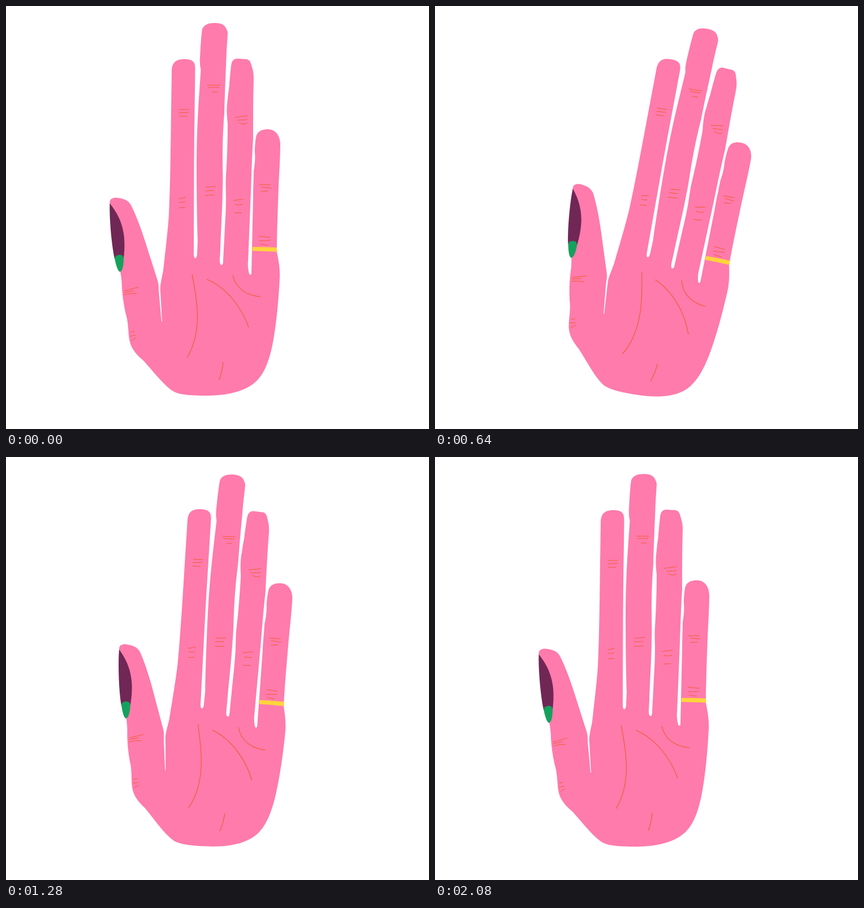
Write an HTML page that moves like this. It is 748 by 748 pixels and loops after 2720 ms.

```html
<!DOCTYPE html>
<html lang="en">
<head>
<meta charset="utf-8">
<title>Waving hand</title>
<style>
  html, body { margin: 0; width: 100%; height: 100%; overflow: hidden; background: #fff; }
  svg { display: block; width: 100%; height: 100%; }
</style>
</head>
<body>
<svg viewBox="0 0 748 748">
  <g id="hand">
    <!-- skin -->
    <path fill="#ff7bac" d="M183.500 349C182.500 341 189 339 195 339C207 340 216 343 221 352C230 370 239 394 246 416
      L267 482C270 490 270 496 270 503L275 558L276 558L273 505C272 494 275 484 278 468
      C281 440 286 400 288 370C290 330 291 270 292 185L293 117C293 101 299 94 316 94
      C330 94 334.500 99 334.500 110C334 160 333 220 332.500 280L332 438C332 443 333 446 335 446
      C337 445 338 442 338 437L339 415C338 390 337 330 337 280C337 240 339 190 342 150
      C343 135 344 122 344.500 112C342.500 105 342.500 96 343.500 82C344.500 65 345.500 50 347 41
      C350 33 358 30 369 30C380 30 386 33 389 39C391 43 392 45 392 49L390 80
      C389 110 387 150 386 190C384 215 383 240 383 265C383 290 384 310 383 325
      C383 350 380 400 379 430L378 449C378 455 379 458 381 458C383 458 384 456 384 450
      L387 392C388 375 389 360 389 338C389 325 388 315 389 300C391 270 392 235 392 208
      C390 190 390 178 392 165C393 152 395 143 395 137C396 125 397 115 398 106
      C399 98 402 93 409 93L424 94C430 94 433 99 434 105C437 114 438 118 438 130
      C437 160 437 200 437 235C435 265 434 300 433 330L428 452C427 460 429 470 430 473
      C431 476 434 476 434 472L437 340C437 320 438 305 438 292C440 280 441 270 440 258
      C440 248 441 238 442 232C444 223 450 218 463 218C476 218 484 228 485 243
      C485 270 483 295 482 320C481 350 479 400 479 435C482 450 485 465 484 482
      C482 520 478 565 471 600C465 628 456 655 436 669C415 684 385 689 352 689
      C330 689 308 688 297 682C280 672 264 650 243 627C230 616 222 606 219 594
      C216 582 217 570 214 553C209 535 206 515 205 497C205 485 203 475 202 469Z"/>
    <!-- thumbnail -->
    <path fill="#702756" d="M183.500 349C182.500 370 186 420 192 447L208 446C210 430 210 415 208 402C204 378 194 362 183.500 349Z"/>
    <path fill="#16a05d" d="M192 446C193 442 197 440 202 440C205 440 207 442 208 446C208 458 206 470 201 470C197 468 194 456 192 446Z"/>
    <!-- ring -->
    <path fill="#ffd43b" d="M436 426Q458 426 479 427L479.500 434.500Q458 433.500 435.500 433Z"/>
    <g fill="none" stroke="#f15a24">
      <!-- finger creases -->
      <path stroke-width=".9" d="M306 183H324M306 189L323 188M306 195L320 195
        M356 140H379M358 144H377M364 152H374
        M405 197L427 194M409 202L427 201M412 206Q419 211 427 207
        M448 316H468M451 320L469 322M451 328L464 327
        M305 341L318 338M306 347Q312 348 317 346M306 357L317 356
        M353 320.500L371 319M352.500 327L368 326M352 335L369 334
        M402 344L420 341.500M405 351Q412 353 419 350.500M404 366L417 365.500
        M447 407L467 409M447 415Q456 416 467 414M449 421L463 423
        M209 504L234 497M209 507L226 503M209 511Q218 508 231 508
        M220 577L227 575M219 584L229 582M222 592L230 586"/>
      <!-- palm lines -->
      <path stroke-width="1.1" d="M329 474C337 515 349 575 320 622M355 483C390 498 417 533 429 568
        M401 476C406 499 425 512 450 514M384 629Q383 645 377 661"/>
    </g>
  </g>
</svg>
<script>
  const LOOP = 2720, STEP = 80, REST = 2080;
  // [time in ms, angle in degrees, bias of the swing leading here]
  const swings = [[0, 0, 1], [342, -6.95, 1], [695, 10.9, 1], [1077, -6.95, 1], [1462, 11, 1], [REST, 0, 0.905]];
  const hand = document.getElementById('hand');

  function angleAt(t) {
    if (t >= REST) return 0;
    const i = swings.findIndex(([end]) => t < end);
    const [t0, a0] = swings[i - 1], [t1, a1, bias] = swings[i];
    const u = ((t - t0) / (t1 - t0)) ** bias;
    return a0 + (a1 - a0) * (1 - Math.cos(Math.PI * u)) / 2;
  }

  const start = performance.now();
  function draw() {
    const t = (performance.now() - start) % LOOP;
    const held = Math.floor(t / STEP) * STEP;
    hand.setAttribute('transform', `rotate(${angleAt(held)} 365 685)`);
    requestAnimationFrame(draw);
  }
  draw();
</script>
</body>
</html>
```
